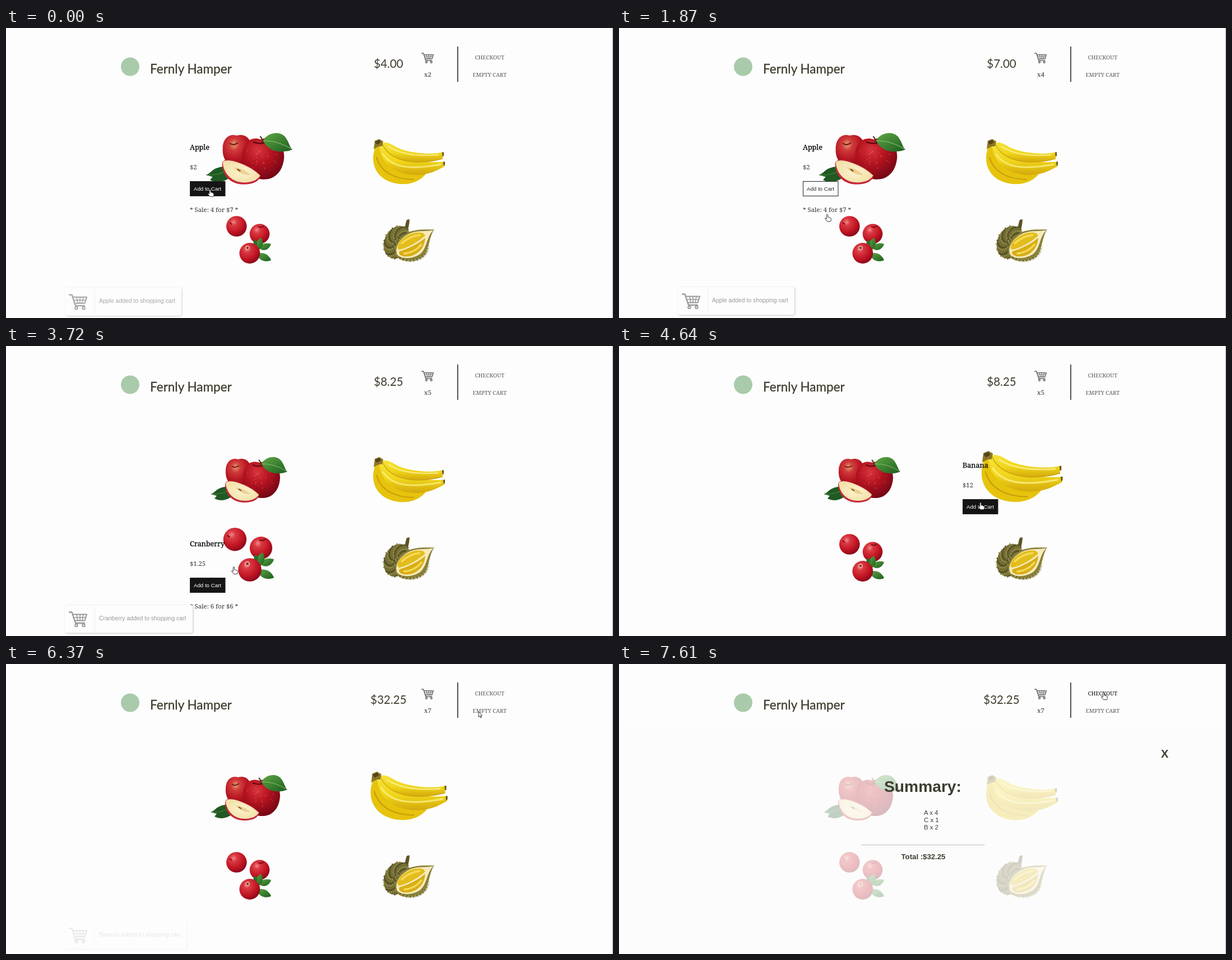
Animation of 1083x517 px, one loop 8000 ms. Source, as an HTML page:

```html
<!DOCTYPE html>
<html lang="en">
<head>
<meta charset="utf-8">
<title>Fruit shop</title>
<style>
  html, body { margin: 0; height: 100%; overflow: hidden; background: #fdfdfd; }
  svg { display: block; width: 100vw; height: 100vh; }
  .slab { font-family: "Noto Serif", serif; font-size: 11.3px; fill: #333; }
  .name { font-size: 12.6px; fill: #000; stroke: #000; stroke-width: .25px; }
  .menu { font-size: 9.7px; fill: #555; text-anchor: middle; }
  .sans { font-family: "Liberation Sans", Arial, sans-serif; }
  .mid { text-anchor: middle; }
  .lato { font-family: Lato, sans-serif; fill: #3f3a2c; }
</style>
</head>
<body>
<svg id="stage" viewBox="0 0 1083 517" xmlns="http://www.w3.org/2000/svg">
  <defs>
    <radialGradient id="red" cx=".38" cy=".3" r=".75">
      <stop offset="0" stop-color="#d8343c"/><stop offset=".45" stop-color="#b3121f"/><stop offset="1" stop-color="#6f0614"/>
    </radialGradient>
    <radialGradient id="blush" cx=".4" cy=".3" r=".75">
      <stop offset="0" stop-color="#e9a06a"/><stop offset=".25" stop-color="#cf3a3c"/><stop offset=".6" stop-color="#b81822"/><stop offset="1" stop-color="#8a0a18"/>
    </radialGradient>
    <radialGradient id="berry" cx=".36" cy=".3" r=".75">
      <stop offset="0" stop-color="#f08a8c"/><stop offset=".22" stop-color="#d93a42"/><stop offset=".65" stop-color="#c11423"/><stop offset="1" stop-color="#83081a"/>
    </radialGradient>
    <linearGradient id="leaf" x2="1" y2="1">
      <stop offset="0" stop-color="#5fa845"/><stop offset="1" stop-color="#1c5c1f"/>
    </linearGradient>
    <linearGradient id="peel" x2="0" y2="1">
      <stop offset="0" stop-color="#f6e23a"/><stop offset=".55" stop-color="#f0d51a"/><stop offset="1" stop-color="#d3a90c"/>
    </linearGradient>
    <radialGradient id="flesh"><stop offset="0" stop-color="#fbf3cf"/><stop offset="1" stop-color="#f3e2ab"/></radialGradient>
    <g id="cart" fill="none" stroke-linecap="round" stroke-linejoin="round">
      <path d="M1 1.5H5.6L12 21H28" stroke-width="2.3"/>
      <path d="M6.8 5.5H32L28.5 16.5H10.5" stroke-width="2.1"/>
      <path d="M8.6 11H30.2M14 5.5L16 16.5M20 5.5V16.5M26 5.5L24 16.5" stroke-width="1.5"/>
      <circle cx="13.5" cy="25" r="2.3" stroke-width="2"/><circle cx="26.5" cy="25" r="2.3" stroke-width="2"/>
    </g>
  </defs>

  <rect width="1083" height="517" fill="#fdfdfd"/>
  <circle cx="221.5" cy="69" r="16.5" fill="#a9cbab"/>
  <text class="lato" x="257" y="81" font-size="22.5" stroke="#3f3a2c" stroke-width=".3">Fernly Hamper</text>
  <text class="lato mid" id="price" x="682.5" y="71" font-size="20.5"></text>
  <use href="#cart" transform="translate(741 44) scale(.67)" stroke="#666"/>
  <text class="mid" id="count" x="752.5" y="87" font-family="Liberation Serif, serif" font-weight="bold" font-size="13" fill="#666"></text>
  <path d="M806 33V96" stroke="#333" stroke-width="1.7"/>
  <text class="slab menu" id="checkout" x="863" y="56">CHECKOUT</text>
  <text class="slab menu" id="empty" x="863" y="87">EMPTY CART</text>

  <g id="apple">
    <path d="M365 264C374 262 374 253 392 251L404 268C392 276 382 277 372 272L376 267Z" fill="#1f5a22"/>
    <path d="M367 264Q384 265 396 258" stroke="#4c8a40" fill="none"/>
    <path d="M414 202C428 198 438 208 437 222C436 240 426 252 412 251C398 250 391 236 392 222C392 207 402 198 414 202Z" fill="url(#blush)"/>
    <path d="M403 214Q409 219 416 213" stroke="#6d2016" fill="none" stroke-width="2"/>
    <path d="M452 208C470 200 489 211 489 235C488 256 476 271 458 271C438 272 423 256 423 235C422 214 436 202 452 208Z" fill="url(#red)"/>
    <path d="M440 212Q454 218 466 209" stroke="#5a0712" fill="none" stroke-width="2"/>
    <path d="M455 213Q455 207 451 203" stroke="#4b3a20" stroke-width="2" fill="none"/>
    <g id="drops" fill="#f3b3b3" opacity=".5"></g>
    <path d="M456 210C462 197 484 193 492 206C497 213 498 221 502 224C488 230 464 229 456 210Z" fill="url(#leaf)"/>
    <path d="M457 210Q480 210 500 223" stroke="#8fc377" fill="none" stroke-width=".9"/>
    <path d="M391 246C393 237 408 240 420 245C434 250 446 258 452 265C450 274 440 279 426 279C405 279 391 266 391 246Z" fill="#c5283a"/>
    <path d="M392 245C394 239 408 241 420 246C434 251 445 259 451 265C447 272 438 276 426 276C407 276 394 263 392 245Z" fill="url(#flesh)"/>
    <path d="M409 252Q424 253 436 264Q420 265 409 252Z" fill="#ecd092"/>
    <path d="M415 255l5 3" stroke="#7a4a1c" stroke-width="2"/>
  </g>

  <g id="banana">
    <path d="M660 210C647 240 660 270 695 277C722 282 740 272 750 259C720 262 690 250 671 214Z" fill="#e6c30d"/>
    <path d="M661 230C668 256 692 270 728 270" stroke="#c69c0a" stroke-width="2" fill="none"/>
    <path d="M666 210C668 245 700 263 735 262C758 261 772 252 782 247L783 238C765 241 710 240 674 207Z" fill="url(#peel)"/>
    <path d="M672 224C688 248 718 254 776 243" stroke="#fbf08a" stroke-width="3" fill="none" opacity=".75"/>
    <path d="M671 205C680 231 712 240 740 239C758 238 770 236 779 233L780 221C765 226 725 225 700 214C690 209 680 201 671 205Z" fill="url(#peel)"/>
    <path d="M671 205C680 231 712 240 740 239C758 238 770 236 779 233" stroke="#c9a00c" fill="none" stroke-width="1.2"/>
    <path d="M682 211Q712 231 772 226" stroke="#fcf4a0" stroke-width="2.5" fill="none" opacity=".7"/>
    <path d="M656 216L658 201L666 198L673 202L671 211C667 210 661 213 656 216Z" fill="#8d7625"/>
    <path d="M658 203l8-4 3 5-7 4z" fill="#54451d"/>
    <path d="M778 222l3-1v7l-2 1zM780 239l3-1v6l-2 2z" fill="#5f4c1a"/>
  </g>

  <g id="cranberry">
    <circle cx="411.3" cy="353.5" r="18.3" fill="url(#berry)"/>
    <circle cx="452.5" cy="367" r="17.8" fill="url(#berry)"/>
    <path d="M399 347l4 3M450 354q5 3 10-1" stroke="#7d0b18" stroke-width="2" fill="none"/>
    <path d="M447 403C455 398 469 402 473 414C464 418 452 416 447 403Z" fill="url(#leaf)"/>
    <path d="M451 392C455 384 464 382 473 385C470 395 459 400 451 392Z" fill="url(#leaf)"/>
    <path d="M449 397C441 388 446 379 455 374C461 384 458 392 449 397Z" fill="url(#leaf)"/>
    <path d="M444 390C439 386 442 380 444 377C449 382 450 387 444 390Z" fill="#2c6c2a"/>
    <circle cx="434.8" cy="401.5" r="18.4" fill="url(#berry)"/>
    <circle cx="431" cy="392" r="4" fill="#e5a096"/><circle cx="431" cy="392" r="2" fill="#8c2a22"/>
  </g>

  <g id="durian">
    <path d="M711 362Q712 350 715 342L720 341Q720 350 716 363Z" fill="#5d5325"/>
    <ellipse cx="698" cy="382" rx="23" ry="30" transform="rotate(24 698 382)" fill="#6c6630"/>
    <g id="spikes"></g>
    <path d="M764 359C752 360 732 357 714 366C697 376 690 394 697 408C706 418 730 418 744 408C755 398 754 374 764 359Z" fill="#8a8138"/>
    <g id="rim"></g>
    <path d="M763 360C750 364 734 359 717 368C701 377 693 392 698 404C706 413 727 412 740 402C752 391 750 372 763 360Z" fill="#f6ebbd"/>
    <path d="M745 366C730 361 711 370 702 382C697 390 698 395 702 395C718 392 740 378 748 370Z" fill="#e3bd1d"/>
    <path d="M748 374C737 384 717 394 702 398C698 405 710 410 724 406C740 401 747 388 748 374Z" fill="#d9ae16"/>
    <path d="M706 384Q720 371 738 369M711 402Q730 400 741 386" stroke="#f4da55" stroke-width="3.5" stroke-linecap="round" fill="none"/>
  </g>

  <g id="info">
    <text class="slab name" id="name" y="217"></text>
    <text class="slab" id="cost" y="252"></text>
    <rect id="button" y="273.5" width="62.5" height="26" stroke="#222"/>
    <text class="sans" id="label" x="7" y="289.5" font-size="9.7">Add to Cart</text>
    <text class="slab" id="sale" y="328"></text>
  </g>

  <g id="summary">
    <rect y="112" width="1083" height="405" fill="#fdfdfd" opacity=".73"/>
    <g class="sans" fill="#3d3d30">
      <text x="967" y="166.5" font-size="20" font-weight="bold">X</text>
      <text class="mid" x="542" y="228" font-size="28.2" font-weight="bold">Summary:</text>
      <g font-size="11.4"><text x="544" y="269">A x 4</text><text x="544" y="282">C x 1</text><text x="544" y="295">B x 2</text></g>
      <path d="M432 322.5H652.5" stroke="#bbb"/>
      <text class="mid" x="543" y="348" font-size="13.2" font-weight="bold">Total :$32.25</text>
    </g>
  </g>

  <g id="toast">
    <rect id="card" x="105" y="461.5" height="50" rx="4" fill="#fdfdfd" style="filter:drop-shadow(1px 1.5px 1.5px rgba(0,0,0,.22))"/>
    <path d="M158.5 464V509" stroke="#eee"/>
    <use href="#cart" transform="translate(112 473)" stroke="#999"/>
    <text class="sans" id="message" x="166" y="489" font-size="10.45" fill="#999"></text>
  </g>

  <path d="M1082.5 0V517" stroke="#aaa"/>
  <g id="cursor" stroke="#222" stroke-linejoin="round">
    <path id="hand" fill="#fff" stroke-width=".9" d="M-1.2 8V1.2a1.2 1.2 0 0 1 2.4 0V5q2-.6 2.2.6q1.8-.4 2 .8q1.5 0 1.4 1.6V9.5q0 1.6-.9 3.2H0L-3.6 8.2q-.6-1.7.9-1.4Z"/>
    <path id="arrow" fill="#fff" stroke-width=".9" d="M0 0V9.5L2.2 7.6L3.7 11L5.2 10.3L3.8 7.1H6.6Z"/>
  </g>
</svg>
<script>
const LOOP = 8000;
const $ = id => document.getElementById(id);
const set = (id, attrs) => { for (const k in attrs) $(id).setAttribute(k, attrs[k]); };
const clamp = v => Math.max(0, Math.min(1, v));
const ramp = (t, start, length) => clamp((t - start) / length);
const ease = p => 1 - Math.pow(1 - p, 2.2);
const within = (t, a, b) => t >= a && t < b;

// hover and press are [on, off] times
const items = [
  { id: 'apple', name: 'Apple', cost: '$2', sale: '* Sale: 4 for $7 *', x: 328, dy: 0, cx: 433, foot: 280,
    hover: [-900, 2000], press: [-900, 1560], toastEnd: 313 },
  { id: 'cranberry', name: 'Cranberry', cost: '$1.25', sale: '* Sale: 6 for $6 *', x: 328, dy: 140, cx: 433.5, foot: 421,
    hover: [2080, 3960], press: [2450, 3720], toastEnd: 333 },
  { id: 'banana', name: 'Banana', cost: '$12', sale: '', x: 613, dy: 0, cx: 718, foot: 280,
    hover: [4330, 6300], press: [4400, 5850], toastEnd: 322 }
];
const totals = [[0, '$4.00', 2], [440, '$6.00', 3], [1250, '$7.00', 4], [3190, '$8.25', 5], [4830, '$20.25', 6], [5450, '$32.25', 7]];
// item, start, time to appear, start of fade, fade length
const toasts = [[0, -340, 400, 440, 1], [0, 440, 400, 930, 230], [0, 1250, 420, 1960, 330],
  [1, 3190, 500, 4000, 400], [2, 4830, 400, 5270, 180], [2, 5450, 430, 6100, 340]];
const path = [[0, 364, 288], [1400, 364, 288], [1900, 372, 335], [2300, 376, 420], [3450, 376, 420], [3720, 406, 394],
  [4190, 622, 299], [4430, 645, 279], [5750, 645, 279], [6090, 688, 222], [6230, 748, 165], [6370, 843, 85],
  [6560, 858, 69], [6740, 864.5, 51], [LOOP, 864.5, 51]];

let seed = 7;
const rand = () => (seed = seed * 16807 % 2147483647) / 2147483647;

function texture() {
  let drops = '', spikes = '', rim = '';
  for (let i = 0; i < 28; i++)
    drops += `<circle cx="${428 + rand() * 52}" cy="${215 + rand() * 42}" r="${.3 + rand() * .6}"/>`;
  for (let i = 0; i < 190; i++) {
    const r = Math.sqrt(i / 190), a = i * 2.4;
    const u = 24 * r * Math.cos(a), v = 31 * r * Math.sin(a);
    const x = 698 + u * .91 - v * .41, y = 382 + u * .41 + v * .91;
    const fill = ['#47431d', '#a39a56', '#827a3b'][i % 3];
    spikes += `<path d="M${x - 1.5} ${y + 1}l1-3.4l2 2.8z" fill="${fill}"/>`;
  }
  for (let i = 0; i < 26; i++) {
    const a = -.3 + i * .1, x = 722 + 30 * Math.cos(a), y = 388 + 25 * Math.sin(a);
    rim += `<path d="M${x - 2} ${y}l4 0l${Math.cos(a) * 4 - 2} ${Math.sin(a) * 4 + 1}z" fill="${i % 2 ? '#6c6630' : '#a39a56'}"/>`;
  }
  $('drops').innerHTML = drops;
  $('spikes').innerHTML = spikes;
  $('rim').innerHTML = rim;
}

function drawItems(t) {
  let open = null;
  for (const it of items) {
    const [on, off] = it.hover;
    const s = 1 + .13 * (ease(ramp(t, on, 300)) - ease(ramp(t, off, 300)));
    set(it.id, { transform: `translate(${it.cx} ${it.foot}) scale(${s}) translate(${-it.cx} ${-it.foot})` });
    if (within(t, on, off)) open = it;
  }
  $('info').style.display = open ? '' : 'none';
  if (!open) return;
  const dark = ramp(t, open.press[0], 240) - ramp(t, open.press[1], 240);
  const grey = v => `rgb(${v},${v},${v})`;
  set('info', { transform: `translate(${open.x} ${open.dy})` });
  set('button', { x: .5, fill: grey(253 - 233 * dark) });
  set('label', { fill: grey(40 + 215 * dark) });
  $('name').textContent = open.name;
  $('cost').textContent = open.cost;
  $('sale').textContent = open.sale;
}

function drawToast(t) {
  const [i, start, rise, out, fade] = toasts.filter(r => t >= r[1]).pop();
  const shown = ramp(t, start, rise), gone = ramp(t, out, fade);
  set('toast', { opacity: shown * (1 - gone), transform: `translate(0 ${8 * (1 - shown) - 4 * gone})` });
  set('card', { width: items[i].toastEnd - 105 });
  $('message').textContent = items[i].name + ' added to shopping cart';
}

function drawCursor(t) {
  const n = path.findIndex(p => t < p[0]);
  const a = path[n - 1], b = path[n], p = ramp(t, a[0], b[0] - a[0]);
  set('cursor', { transform: `translate(${a[1] + (b[1] - a[1]) * p} ${a[2] + (b[2] - a[2]) * p})` });
  const arrow = within(t, 3960, 4330) || within(t, 6300, 6450);
  $('arrow').style.display = arrow ? '' : 'none';
  $('hand').style.display = arrow ? 'none' : '';
}

function draw(t) {
  const [, price, count] = totals.filter(r => t >= r[0]).pop();
  $('price').textContent = price;
  $('count').textContent = 'x' + count;
  $('empty').style.fill = within(t, 6450, 6650) ? '#000' : '';
  $('checkout').style.fill = t >= 6700 ? '#000' : '';
  drawItems(t);
  drawToast(t);
  set('summary', { opacity: Math.pow(ramp(t, 6740, 840), 1.3) });
  drawCursor(t);
}

texture();
const begin = performance.now();
function tick() {
  draw((performance.now() - begin) % LOOP);
  requestAnimationFrame(tick);
}
tick();
</script>
</body>
</html>
```
